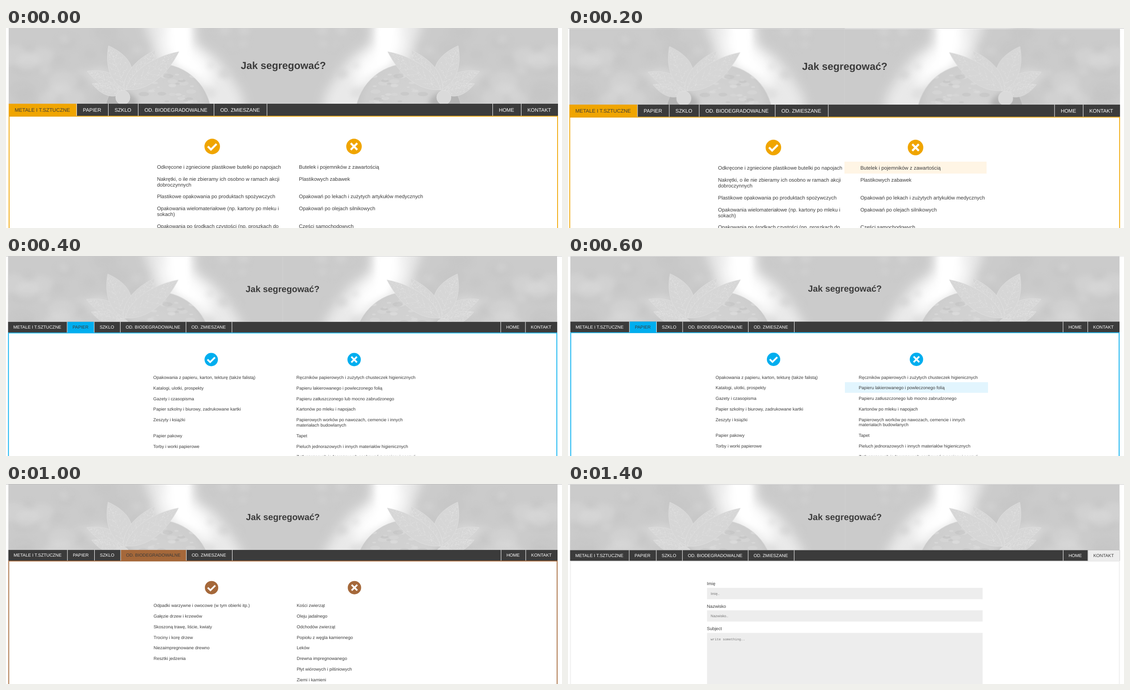
An HTML page for the animation above (1.6 s loop, 1247 by 449 pixels).

```html
<!DOCTYPE html>
<html lang="pl">
<head>
<meta charset="utf-8">
<title>Jak segregować?</title>
<style>
html, body { margin: 0; width: 100%; height: 100%; overflow: hidden; background: #fff; }
svg { display: block; width: 1247px; height: 449px; }
text { font-family: "Liberation Sans", Arial, sans-serif; fill: #3b3b3b; text-rendering: geometricPrecision; white-space: pre; }
.mono { font-family: "Liberation Mono", monospace; }
</style>
</head>
<body>
<svg viewBox="0 0 1247 449" xmlns="http://www.w3.org/2000/svg">
  <defs>
    <filter id="soft" x="-30%" y="-30%" width="160%" height="160%"><feGaussianBlur stdDeviation="6"/></filter>
    <filter id="glow" x="-30%" y="-30%" width="160%" height="160%"><feGaussianBlur stdDeviation="13"/></filter>
    <radialGradient id="earth" cx=".45" cy=".4" r=".6">
      <stop offset="0" stop-color="#d4d4d4"/><stop offset=".75" stop-color="#cecece"/><stop offset="1" stop-color="#c0c0c0"/>
    </radialGradient>
    <clipPath id="left"><rect x="0" y="-5" width="621.2" height="200"/></clipPath>
    <clipPath id="head"><rect id="headBox" y="0" height="200"/></clipPath>
    <clipPath id="ball"><circle cx="340" cy="200" r="120"/></clipPath>
    <g id="half" clip-path="url(#left)"></g>
  </defs>
  <g id="page">
    <g clip-path="url(#head)">
      <g id="photo">
        <use href="#half"/>
        <use href="#half" transform="translate(1242 0) scale(-1 1)"/>
      </g>
    </g>
    <g id="content"></g>
  </g>
  <rect id="topLine" width="1247" height="1"/>
</svg>
<script>
const $ = id => document.getElementById(id);
const DARK = '#3b3b3b';

let seed = 7;
const rnd = (a, b) => {
  seed = (seed * 16807) % 2147483647;
  return a + (b - a) * seed / 2147483647;
};
const rect = (x, y, w, h, fill) => `<rect x="${x}" y="${y}" width="${w}" height="${h}" fill="${fill}"/>`;
const text = (x, y, size, str, attrs = '') => `<text x="${x}" y="${y}" font-size="${size}" ${attrs}>${str}</text>`;

// ---- header picture (left half, mirrored by <use>) ----
// a and b are the bulges on either side of the midrib
function leaf(x0, y0, x1, y1, a, b) {
  const dx = x1 - x0, dy = y1 - y0, len = Math.hypot(dx, dy);
  const at = (t, s) => `${(x0 + dx * t - dy / len * s).toFixed(1)} ${(y0 + dy * t + dx / len * s).toFixed(1)}`;
  const half = (t, s) => s * 2.3 * t * (1 - t);
  let veins = `M${at(0, 0)}L${at(.97, 0)}`, drops = '';
  for (let t = .15; t < .8; t += .13) {
    veins += `M${at(t, 0)}L${at(t + .13, half(t + .1, a))}M${at(t, 0)}L${at(t + .13, -half(t + .1, b))}`;
  }
  for (let i = 0; i < 120; i++) {
    const t = rnd(.08, .93), s = rnd(-1, 1);
    drops += `M${at(t, half(t, s > 0 ? s * a : s * b))}h${rnd(.3, 1.5).toFixed(1)}`;
  }
  return `<path d="M${at(0, 0)}C${at(.25, a * 1.1)} ${at(.65, a * .9)} ${at(1, 0)}C${at(.65, -b * .9)} ${at(.25, -b * 1.1)} ${at(0, 0)}Z" fill="#d6d6d6" stroke="#e3e3e3" stroke-width=".8"/>
    <path d="${veins}" fill="none" stroke="#dfdfdf" stroke-width=".7"/>
    <path d="${drops}" stroke="#e8e8e8"/>`;
}

function blobs(n, [x0, x1], [y0, y1], [r0, r1], flat, fills, opacity) {
  let out = '';
  for (let i = 0; i < n; i++) {
    const r = rnd(r0, r1);
    out += `<ellipse cx="${rnd(x0, x1)}" cy="${rnd(y0, y1)}" rx="${r}" ry="${r * flat}" fill="${fills[i % fills.length]}" opacity="${opacity}"/>`;
  }
  return out;
}

function drawHalf() {
  $('half').innerHTML = rect(0, -5, 640, 200, '#cbcbcb') +
    `<g filter="url(#soft)">${blobs(34, [0, 320], [0, 170], [10, 34], .7, ['#dadada', '#c3c3c3'], .45)}</g>
    <path d="M305-30H418L425 35L470 65L500 105L528 150L535 200H400L340 90Z" fill="#e9e9e9" filter="url(#glow)"/>
    <path d="M358-30H410L412 40L448 75L462 110L455 135L430 110L375 75L352 45Z" fill="#fff" filter="url(#glow)"/>
    <path d="M372-20H410V70L440 105L385 80Z" fill="#fff" filter="url(#soft)"/>
    <g filter="url(#soft)">${blobs(14, [435, 545], [0, 150], [6, 16], .8, ['#cbcbcb', '#d8d8d8'], .5)}</g>
    <circle cx="340" cy="200" r="120" fill="url(#earth)" stroke="#dadada"/>
    <g clip-path="url(#ball)">
      <ellipse cx="248" cy="168" rx="46" ry="26" fill="#b4b4b4" filter="url(#soft)"/>
      ${blobs(34, [305, 425], [95, 165], [3, 12], .42, ['#dedede', '#d9d9d9', '#c4c4c4'], .6)}
    </g>` +
    leaf(268, 138, 181, 97, 24, 18) + leaf(264, 144, 192, 125, 12, 22) +
    leaf(268, 138, 229, 40, 40, 26) + leaf(264, 140, 334, 50, 26, 24) + leaf(268, 138, 387, 53, 30, 26) +
    '<circle cx="261" cy="156" r="16" fill="#dadada" stroke="#e2e2e2"/>';
}

// ---- page layouts ----
const BIG = {
  x: 6, r: 1238, nav: 170, navH: 27.2, font: 11.45, title: 22.9, titleX: 622, titleY: 92,
  tabs: [6, 159, 230, 297, 467, 585.8], right: [1092, 1156, 1239], pad: 13.4, navY: 187.5,
  icons: [462.5, 780.5], iconY: 266, iconR: 17.4, cols: [338.7, 657], first: 315.8,
  line: 13, gap: 13.7, mark: [303.4, 621.4], markW: 318, markUp: 18.1, photo: 1
};
const SMALL = {
  x: 5.3, r: 1237, nav: 147.3, navH: 24, font: 9.92, title: 19.85, titleX: 621, titleY: 80.4,
  tabs: [5.5, 138.3, 199, 257.6, 404.9, 508], right: [1110.8, 1166.2, 1238], pad: 11.6, navY: 162.8,
  icons: [461, 781.5], iconY: 232, iconR: 15, cols: [331, 652], first: 275.5,
  line: 11.7, gap: 12.1, mark: [300, 621], markW: 321, markUp: 16, photo: 0
};
const LEFT_TABS = ['METALE I T.SZTUCZNE', 'PAPIER', 'SZKLO', 'OD. BIODEGRADOWALNE', 'OD. ZMIESZANE'];
const RIGHT_TABS = ['HOME', 'KONTAKT'];

const METAL = { tab: 0, color: '#f0a500', tint: '#fff5e5', layout: BIG, rows: [
  ['Odkręcone i zgniecione plastikowe butelki po napojach', 'Butelek i pojemników z zawartością'],
  ['Nakrętki, o ile nie zbieramy ich osobno w ramach akcji|dobroczynnych', 'Plastikowych zabawek'],
  ['Plastikowe opakowania po produktach spożywczych', 'Opakowań po lekach i zużytych artykułów medycznych'],
  ['Opakowania wielomateriałowe (np. kartony po mleku i|sokach)', 'Opakowań po olejach silnikowych'],
  ['Opakowania po środkach czystości (np. proszkach do', 'Części samochodowych']
] };
const PAPER = { tab: 1, color: '#00aeef', tint: '#e2f5fe', layout: SMALL, rows: [
  ['Opakowania z papieru, karton, tekturę (także falistą)', 'Ręczników papierowych i zużytych chusteczek higienicznych'],
  ['Katalogi, ulotki, prospekty', 'Papieru lakierowanego i powleczonego folią'],
  ['Gazety i czasopisma', 'Papieru zatłuszczonego lub mocno zabrudzonego'],
  ['Papier szkolny i biurowy, zadrukowane kartki', 'Kartonów po mleku i napojach'],
  ['Zeszyty i książki', 'Papierowych worków po nawozach, cemencie i innych|materiałach budowlanych'],
  ['Papier pakowy', 'Tapet'],
  ['Torby i worki papierowe', 'Pieluch jednorazowych i innych materiałów higienicznych'],
  ['', 'Zatłuszczonych jednorazowych opakowań z papieru i naczyń']
] };
const GLASS = { tab: 2, color: '#85bd3b', layout: SMALL, rows: [
  ['Butelki i słoiki po napojach i żywności (w tym butelki po napojach|alkoholowych i olejach roślinnych)', 'Ceramiki, doniczek, porcelany, fajansu, kryształów'],
  ['Szklane opakowania po kosmetykach (jeżeli nie są wykonane z|trwale połączonych kilku surowców)', 'Szkła okularowego'],
  ['', 'Szkła żaroodpornego'],
  ['', 'Zniczy z zawartością wosku'],
  ['', 'Żarówek i świetlówek'],
  ['', 'Reflektorów'],
  ['', 'Opakowań po lekach, rozpuszczalnikach, olejach silnikowych']
] };
const BIO = { tab: 3, color: '#a5683a', layout: SMALL, rows: [
  ['Odpadki warzywne i owocowe (w tym obierki itp.)', 'Kości zwierząt'],
  ['Gałęzie drzew i krzewów', 'Oleju jadalnego'],
  ['Skoszoną trawę, liście, kwiaty', 'Odchodów zwierząt'],
  ['Trociny i korę drzew', 'Popiołu z węgla kamiennego'],
  ['Niezaimpregnowane drewno', 'Leków'],
  ['Resztki jedzenia', 'Drewna impregnowanego'],
  ['', 'Płyt wiórowych i pilśniowych'],
  ['', 'Ziemi i kamieni']
] };
const MIXED = { tab: 4, color: '#616b87', layout: SMALL, body: mixedBody };
const CONTACT = { tab: 6, color: '#ededed', layout: SMALL, body: contactBody };

function icon(x, y, r, color, mark) {
  return `<g transform="translate(${x} ${y}) scale(${r / 248})"><circle r="248" fill="${color}"/>
    <path d="${mark}" fill="none" stroke="#fff" stroke-width="64"/></g>`;
}
const CHECK = 'M-140-3L-40 97L138-81', CROSS = 'M-104-104L104 104M104-104L-104 104';

function listBody(p, hover) {
  const L = p.layout;
  let out = icon(L.icons[0], L.iconY, L.iconR, p.color, CHECK) + icon(L.icons[1], L.iconY, L.iconR, p.color, CROSS);
  let y = L.first;
  p.rows.forEach((row, i) => {
    const cells = row.map(s => s.split('|'));
    const h = L.gap + L.line * Math.max(...cells.map(c => c.length));
    cells.forEach((lines, c) => {
      if (hover && hover[0] === c && hover[1] === i) out += rect(L.mark[c], y - L.markUp, L.markW, h, p.tint);
      lines.forEach((s, n) => { out += text(L.cols[c], y + n * L.line, L.font, s); });
    });
    y += h;
  });
  return out;
}

function mixedBody(p) {
  const L = p.layout;
  return rect(L.x, 349, L.r - L.x, 1.6, p.color) + rect(L.x, 350.4, L.r - L.x, 49, '#eee') +
    rect(0, 399.4, 1247, 60, '#fff') +
    icon(621, 231.5, L.iconR, p.color, CHECK) +
    text(300.2, 282.8, L.font, 'Do pojemnika z odpadami zmieszanymi należy wrzucać wszystko to, czego nie można odzyskać w procesie recyklingu, z wyłączeniem odpadów') +
    text(300.2, 300, L.font, 'niebezpiecznych.') +
    text(621.2, 377.2, 7.6, '<tspan font-weight="bold">ubz</tspan> - copyright © 2020', 'text-anchor="middle" letter-spacing=".22"');
}

function contactBody() {
  const fields = [['Imię', 226, 25.4], ['Nazwisko', 276.3, 25.2], ['Subject', 327, 130]];
  return fields.map(([name, y, h], i) =>
    text(312, y, 10, name) + rect(312.3, y + 6, 617.5, h, '#ededed') +
    (i < 2 ? text(320.5, y + 21.8, 8.1, name + '..', 'style="fill:#757575"')
           : text(320.5, y + 22.2, 7.55, 'write something..', 'class="mono" style="fill:#757575"'))
  ).join('');
}

function nav(p) {
  const L = p.layout;
  let out = rect(L.x, L.nav, L.r - L.x, L.navH, DARK);
  const group = (names, edges, start) => names.forEach((name, i) => {
    const on = p.tab === start + i, x = edges[i];
    if (on) out += rect(x, L.nav, edges[i + 1] - x - 1, L.navH + .5, p.color);
    if (start + i > 0) out += rect(x - 1, L.nav, 1, L.navH, '#fff');
    out += text(x + L.pad, L.navY, L.font, name, on ? '' : 'style="fill:#fff"');
  });
  group(LEFT_TABS, L.tabs, 0);
  out += rect(L.tabs[5] - 1, L.nav, 1, L.navH, '#fff');
  group(RIGHT_TABS, L.right, 5);
  return out;
}

// start ms, page, [dx, dy, scale], top line [colour, y], hovered [column, row]
const STATES = [
  [0, METAL, [0, 0, 1], ['none', 0]],
  [100, METAL, [-1.5, 1, 1.0012], ['#d0d0d0', 0], [0, 0]],
  [200, METAL, [-3, 1.6, 1.0025], ['#bdbdbd', 0], [1, 0]],
  [300, METAL, [-3, 1.6, 1.0025], ['#bdbdbd', 0], [1, 2]],
  [400, PAPER, [-.7, .5, 1], ['#cacaca', 0]],
  [500, PAPER, [-.3, .3, 1], ['#d6d6d6', 0], [0, 1]],
  [600, PAPER, [0, 0, 1], ['#e2e2e2', 0], [1, 1]],
  [700, PAPER, [0, .3, 1], ['#d6d6d6', 0], [1, 3]],
  [800, GLASS, [0, .7, 1], ['#bdbdbd', 0]],
  [1000, BIO, [0, .7, 1], ['#bdbdbd', 0]],
  [1200, MIXED, [-.7, .1, 1.0009], ['#dedede', 0]],
  [1400, CONTACT, [-.7, 1, 1.0009], ['#c6c6c6', .5]]
];

function draw([, p, [dx, dy, k], [lineColor, lineY], hover]) {
  const L = p.layout, w = L.r - L.x, top = L.nav + L.navH;
  $('page').setAttribute('transform', `translate(${dx} ${dy}) scale(${k})`);
  $('headBox').setAttribute('x', L.x);
  $('headBox').setAttribute('width', w);
  $('photo').setAttribute('transform', `translate(${L.photo} 0)`);
  $('topLine').setAttribute('fill', lineColor);
  $('topLine').setAttribute('y', lineY);
  $('content').innerHTML =
    text(L.titleX, L.titleY, L.title, 'Jak segregować?', 'font-weight="bold" text-anchor="middle"') +
    rect(0, L.nav, 1247, 300, '#fff') +
    rect(L.x, top, w, 300, p.color) + rect(L.x + 1.8, top + 1.8, w - 3.6, 300, '#fff') +
    nav(p) + (p.body ? p.body(p) : listBody(p, hover));
}

let shown = null;
function tick(now) {
  const t = now % 1600;
  const state = STATES.filter(s => s[0] <= t).pop();
  if (state !== shown) draw(shown = state);
  requestAnimationFrame(tick);
}

drawHalf();
draw(shown = STATES[0]);
requestAnimationFrame(tick);
</script>
</body>
</html>
```
